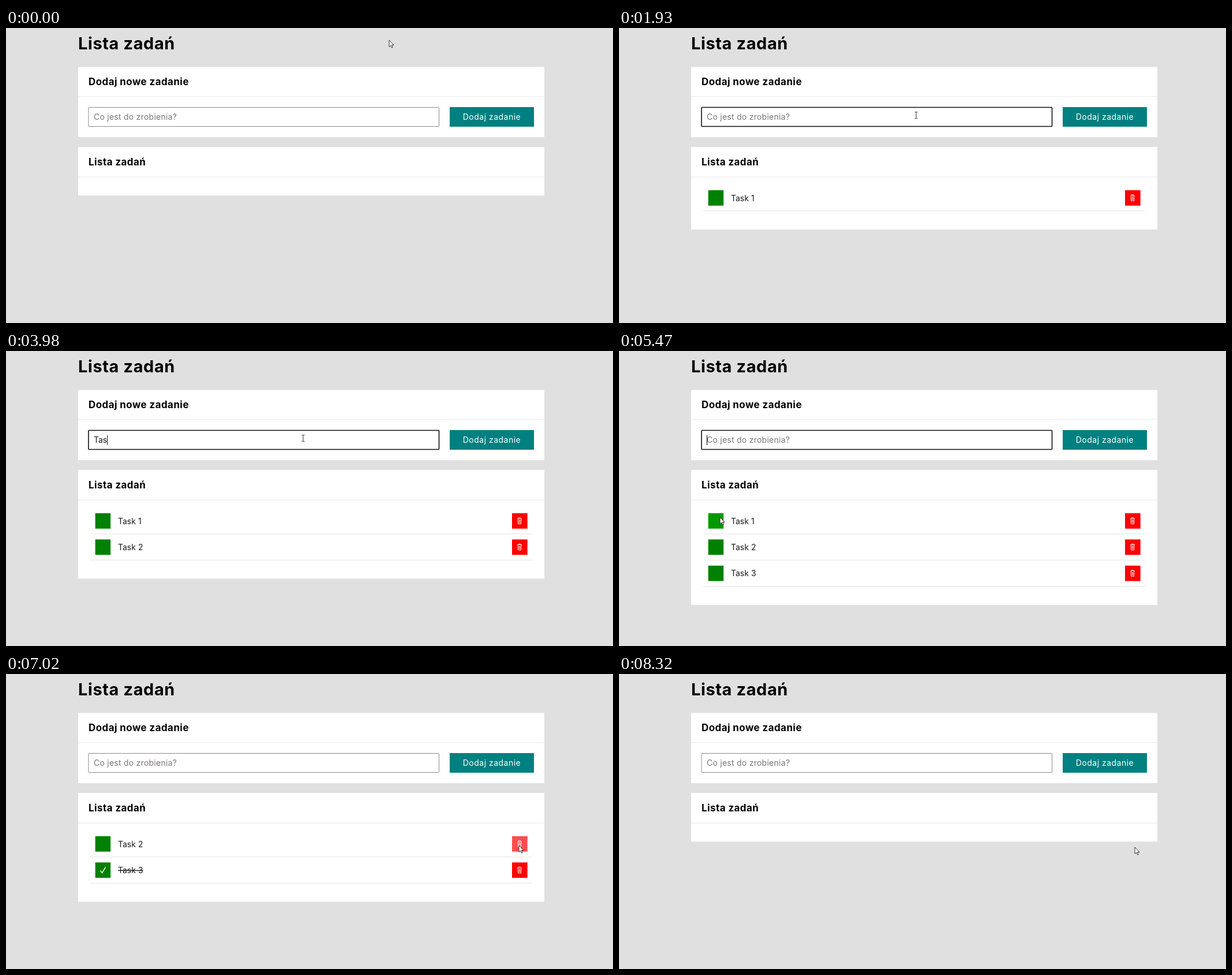
An HTML page that plays this animation: 1052x511 px, repeating every 9150 ms.

```html
<!DOCTYPE html>
<html lang="pl">
<head>
<meta charset="utf-8">
<title>Lista zadań</title>
<style>
  html, body { margin: 0; width: 100%; height: 100%; overflow: hidden; background: #e0e0e0; }
  svg { display: block; width: 1052px; height: 511px; }
  text { font: 400 14px Montserrat, Inter, sans-serif; white-space: pre; fill: #1a1a1a; }
  .title { font-size: 29px; font-weight: 700; letter-spacing: .02em; fill: #000; }
  .heading { font-size: 17px; font-weight: 700; letter-spacing: .024em; fill: #000; }
  .hint { letter-spacing: .018em; fill: #7a7676; }
  .action { letter-spacing: .035em; fill: #fff; text-anchor: middle; }
  .panel { fill: #fff; }
  .rule { fill: #eee; }
  .icon { fill: none; stroke: #fff; }
  .done text { text-decoration: line-through; }
  .check { visibility: hidden; stroke-width: 1.5; }
  .done .check { visibility: visible; }
</style>
</head>
<body>
<svg viewBox="0 0 1052 511">
  <rect width="1052" height="511" fill="#e0e0e0"/>
  <text class="title" x="125" y="37">Lista zadań</text>

  <rect class="panel" x="125" y="67.5" width="808" height="121.5"/>
  <rect class="rule" x="125" y="118" width="808" height="1.3"/>
  <text class="heading" x="143" y="99">Dodaj nowe zadanie</text>
  <rect id="field" x="143" y="137.5" width="607.5" height="33" rx="1" fill="#fff"/>
  <text id="hint" class="hint" x="152" y="159">Co jest do zrobienia?</text>
  <text id="typed" x="152" y="159"></text>
  <rect id="caret" y="146" width="1" height="17" fill="#000"/>
  <rect x="769" y="137" width="146" height="34" fill="#008080"/>
  <text class="action" x="842" y="159">Dodaj zadanie</text>

  <rect id="list" class="panel" x="125" y="206" width="808"/>
  <rect class="rule" x="125" y="257.5" width="808" height="1.3"/>
  <text class="heading" x="143" y="238">Lista zadań</text>
  <g id="rows"></g>

  <g id="cursor">
    <path id="arrow" d="M0 0V11.6L2.7 9.2L4.5 13.2L6.3 12.4L4.5 8.5H8Z" fill="#fff" stroke="#222" stroke-width=".9"/>
    <path id="beam" d="M-2.5-5.5H-.7L0-5L.7-5.5H2.5M0-5V5M-2.5 5.5H-.7L0 5L.7 5.5H2.5" fill="none" stroke="#333"/>
  </g>
</svg>
<script>
const LOOP = 9150, ROW_TOP = 281, ROW_STEP = 45.4;
const BLUR = 5530;

// [time, tasks in order, finished tasks]
const lists = [
  [0, '', ''], [1900, '1', ''], [3210, '12', ''], [4490, '123', ''],
  [BLUR, '123', '1'], [6200, '123', '13'], [6990, '23', '3'],
  [7600, '2', ''], [8290, '', '']
];

// [time, text in the field, caret shown]
const entries = [[0, '', false], [870, '', true]];
function type(text, times) {
  times.forEach((time, i) => entries.push([time, text.slice(0, i + 1), true]));
}
function clear(time, caretTime) {
  entries.push([time, '', false], [caretTime, '', true]);
}
type('Task 1', [1100, 1210, 1320, 1420, 1530, 1640]);
clear(1900, 2160);
type('Task 2', [2420, 2590, 2690, 2790, 2880, 3010]);
clear(3210, 3540);
type('Task 3', [3620, 3710, 3980, 4050, 4120, 4320]);
clear(4490, 4790);
entries.push([BLUR, '', false]);

// [time, x, y] of the pointer
const path = [
  [290, 664, 21], [620, 515, 151], [4790, 515, 151], [5460, 175, 288],
  [5580, 175, 288], [5700, 174, 323], [6000, 176, 381], [6210, 176, 381],
  [6720, 889, 297], [7130, 889, 297], [7390, 891, 340], [7640, 891, 340],
  [8060, 894, 300]
];

const $ = id => document.getElementById(id);
const current = (table, t) => table.findLast(step => step[0] <= t);
const show = (el, on) => el.setAttribute('visibility', on ? 'visible' : 'hidden');

function pointerAt(t) {
  const i = path.findIndex(p => p[0] > t);
  if (i === 0) return path[0].slice(1);
  if (i < 0) return path.at(-1).slice(1);
  const [t0, x0, y0] = path[i - 1], [t1, x1, y1] = path[i];
  const u = (t - t0) / (t1 - t0), ease = u * u * (3 - 2 * u);
  return [x0 + (x1 - x0) * ease, y0 + (y1 - y0) * ease];
}

const rows = [0, 1, 2].map(i => {
  const g = document.createElementNS('http://www.w3.org/2000/svg', 'g');
  g.setAttribute('transform', `translate(0 ${ROW_TOP + i * ROW_STEP})`);
  g.innerHTML = `
    <rect class="toggle" x="154.7" width="26.5" height="26.7"/>
    <path class="icon check" d="M163.6 14L166.6 18.2L172.4 8.2"/>
    <text x="194" y="18.6"></text>
    <rect class="remove" x="877" width="26.7" height="26.7"/>
    <path class="icon" d="M886 9.2H894M888.3 9V7.8H891.7V9M887 9.5L887.5 18.5H892.5L893 9.5M889.1 11V17M890.9 11V17" stroke-width=".9"/>
    <rect x="146" y="35.3" width="766" height="1.1" fill="#e6e6e6"/>`;
  $('rows').append(g);
  return g;
});

function draw(t) {
  const [x, y] = pointerAt(t);
  const [, tasks, finished] = current(lists, t);
  const [, text, caretOn] = current(entries, t);
  const focused = t >= 650 && t < BLUR;

  $('field').setAttribute('stroke', focused ? '#111' : '#8a8a8a');
  $('field').setAttribute('stroke-width', focused ? 1.6 : 1);
  show($('hint'), !text);
  $('typed').textContent = text;
  show($('caret'), caretOn);
  $('caret').setAttribute('x', 152 + (text ? $('typed').getComputedTextLength() : 0));

  const bottom = tasks ? 303.6 + ROW_STEP * tasks.length : 290.3;
  $('list').setAttribute('height', bottom - 206);
  rows.forEach((row, i) => {
    const id = tasks[i];
    row.style.display = id ? '' : 'none';
    if (!id) return;
    const dy = y - ROW_TOP - i * ROW_STEP;
    const over = left => dy >= 0 && dy < 26.7 && x >= left && x < left + 26.7;
    row.setAttribute('class', finished.includes(id) ? 'done' : '');
    row.querySelector('text').textContent = 'Task ' + id;
    row.querySelector('.toggle').setAttribute('fill', over(154.7) ? '#009a00' : '#008000');
    row.querySelector('.remove').setAttribute('fill', over(877) ? '#ff4d4d' : '#f00');
  });

  const inField = x > 143 && x < 751 && y > 137 && y < 171;
  $('cursor').setAttribute('transform', `translate(${Math.round(x)} ${Math.round(y)})`);
  show($('arrow'), !inField);
  show($('beam'), inField);
}

const start = performance.now();
function tick() {
  draw((performance.now() - start) % LOOP);
  requestAnimationFrame(tick);
}
tick();
</script>
</body>
</html>
```
